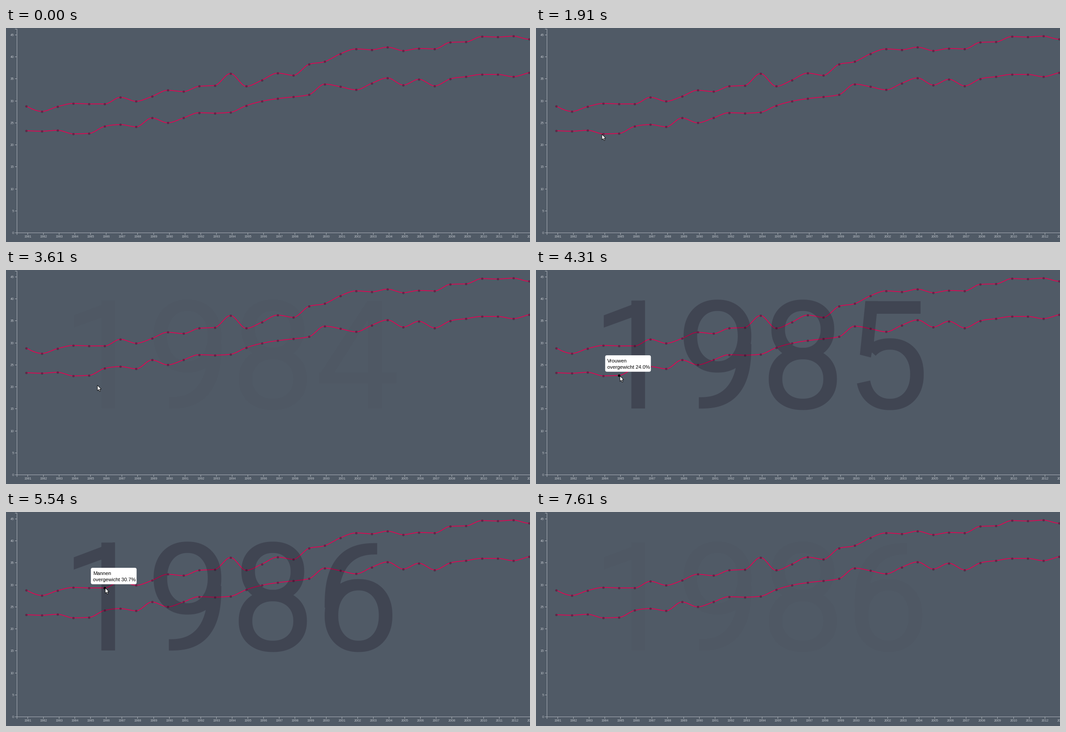
These frames come from a looping animation (1169x479 px, 8.09 s). A matplotlib script:

```python
import numpy as np
import matplotlib.pyplot as plt
from matplotlib.animation import FuncAnimation
from matplotlib.patches import FancyBboxPatch, PathPatch, Polygon
from matplotlib.path import Path

W, H, DPI = 1169, 479, 64
PX = 72 / DPI                      # points per pixel
FRAMES, STEP = 200, 40.45          # one loop of 8090 ms

BG, AXIS, LABEL, LINE, DOT = "#505a66", "#abb1b9", "#bfc4ca", "#e60052", "#501e3c"
BIG = (0.08, 0.03, 0.10)
BIG_ALPHA, GHOST = 0.25, 0.06
FADE_OUT = 500

plt.rcParams["font.family"] = "Liberation Sans"

# yearly share in percent, from 1981 on
MEN = [28.8, 27.6, 28.7, 29.4, 29.3, 29.3, 30.8, 29.9, 31.0, 32.4, 32.1,
       33.3, 33.5, 36.2, 33.3, 34.7, 36.3, 35.8, 38.3, 38.9, 40.7, 41.8,
       41.6, 42.2, 41.4, 41.9, 41.8, 43.3, 43.4, 44.6, 44.5, 44.7, 44.0, 44.1]
WOMEN = [23.2, 23.1, 23.3, 22.5, 22.6, 24.2, 24.6, 24.1, 26.1, 25.0, 26.1,
         27.3, 27.2, 27.4, 28.9, 29.9, 30.5, 30.9, 31.4, 33.8, 33.2, 32.5,
         34.0, 35.2, 33.6, 34.9, 33.4, 35.0, 35.5, 36.0, 36.0, 35.5, 36.4, 37.2]
YEARS = 1981 + np.arange(len(MEN))


def px(year):
    return 45.1 + 35.05 * (year - 1981)


def py(value):
    return 458.5 - 9.85 * np.asarray(value)


# year, label, share, series, appears, fade-in time, disappears
HOVERS = [
    (1984, "Vrouwen", "23.9", WOMEN, 1980, 220, 2910),
    (1985, "Vrouwen", "24.0", WOMEN, 4270, 0, 4770),
    (1986, "Mannen", "30.7", MEN, 5300, 180, 6540),
]

# pointer stops (time, x, y): it rests on each hovered dot in between
STOPS = [(70, 1029, 424), (620, 290, 241), (840, 223, 259), (1680, 147, 239),
         (1910, 147, 238), (3610, 204, 258), (7300, 688, 390), (7590, 1030, 474)]
for year, _, _, values, start, _, end in HOVERS:
    tip = px(year) + 1, float(py(values[year - 1981]))
    STOPS += [(start + 150, *tip), (end, *tip)]
TRACK = np.array(sorted(STOPS), float)
ARROW = np.array([(0, 0), (0, 12.2), (2.8, 9.6), (4.8, 14), (6.7, 13.2),
                  (4.8, 8.9), (8.6, 8.7)])


def monotone(x, y, at):
    """Cubic curve through the points that never overshoots them."""
    h = np.diff(x)
    s = np.diff(y) / h
    mean = (s[:-1] * h[1:] + s[1:] * h[:-1]) / (h[:-1] + h[1:])
    low = np.minimum(np.minimum(abs(s[:-1]), abs(s[1:])), 0.5 * abs(mean))
    inner = (np.sign(s[:-1]) + np.sign(s[1:])) * low
    m = np.concatenate([[1.5 * s[0] - inner[0] / 2], inner,
                        [1.5 * s[-1] - inner[-1] / 2]])
    k = np.clip(np.searchsorted(x, at, side="right") - 1, 0, len(h) - 1)
    u = (at - x[k]) / h[k]
    return ((1 + 2 * u) * (1 - u) ** 2 * y[k] + u * (1 - u) ** 2 * h[k] * m[k]
            + u * u * (3 - 2 * u) * y[k + 1] - u * u * (1 - u) * h[k] * m[k + 1])


# Digits are built from bars and curved bands, y up, on a 2048 unit em.
def band(cx, cy, rx, ry, a0=360, a1=0, n=2.2):
    """Clockwise superellipse stroke, heavier at the sides than at the top."""
    a = np.radians(np.linspace(a0, a1, 90))
    c, s = np.cos(a), np.sin(a)
    unit = np.column_stack([np.sign(c) * abs(c) ** (2 / n),
                            np.sign(s) * abs(s) ** (2 / n)])
    half = np.array([92, 77])
    outer, inner = unit * ((rx, ry) + half), unit * ((rx, ry) - half)
    return np.vstack([outer, inner[::-1]]) + (cx, cy)


def bar(x0, y0, x1, y1):
    return np.array([(x0, y0), (x0, y1), (x1, y1), (x1, y0)], float)


def shape(*points):
    return np.array(points, float)


NINE = [band(558, 982, 366, 418), band(306, 875, 618, 799, 0, -90, n=2.6)]
DIGITS = {
    "1": [bar(544, 0, 729, 1464),
          shape((171, 1097), (171, 1264), (700, 1464), (729, 1464), (544, 1233))],
    "4": [bar(699, 0, 885, 1456), bar(35, 339, 1087, 491),
          shape((35, 339), (35, 448), (688, 1456), (699, 1456), (699, 1208),
                (245, 491))],
    "5": [bar(258, 1285, 1004, 1456), band(590, 465, 365, 410, 133, -167),
          shape((184, 730), (258, 1456), (430, 1456), (371, 888), (332, 692))],
    "6": [(1129, 1456) - part for part in NINE],
    "8": [band(562, 1073, 333, 327), band(562, 400, 369, 344)],
    "9": NINE,
}


def big_number(number, left=123, base=310, scale=0.165, advance=1150):
    parts = []
    for i, ch in enumerate(str(number)):
        for part in DIGITS[ch]:
            pts = (part + (i * advance, 0)) * (scale, -scale) + (left, base)
            parts.append(Path(np.vstack([pts, pts[:1]]), closed=True))
    return Path.make_compound_path(*parts)


fig = plt.figure(figsize=(W / DPI, H / DPI), dpi=DPI, facecolor=BG)
ax = fig.add_axes([0, 0, 1, 1])
ax.set_xlim(0, W)
ax.set_ylim(H, 0)
ax.axis("off")


def label(x, y, text, size, **kw):
    return ax.text(x, y, text, fontsize=size * PX, va="baseline", **kw)


def rule(xs, ys):
    ax.plot(xs, ys, color=AXIS, lw=PX, solid_capstyle="butt",
            solid_joinstyle="miter", snap=False, zorder=1)


# axes
rule([20, 24.5, 24.5], [2.5, 2.5, 458])
rule([24, W + 5], [458.5, 458.5])
rule([24.5, 24.5], [459, 463])
for v in range(0, 50, 5):
    y = np.floor(py(v)) + 0.5
    rule([20, 24], [y, y])
    label(18, y + 2.6, str(v), 7.2, color=LABEL, ha="right")
for year in YEARS:
    x = np.floor(48.6 + 35.05 * (year - 1981)) + 0.5
    rule([x, x], [459, 463])
    label(x + 0.2, 469.2, str(year), 7.2, color=LABEL, ha="center", clip_on=True)

# series
fine = np.linspace(px(1981), px(2014), 900)
for values in (MEN, WOMEN):
    ax.plot(fine, monotone(px(YEARS), py(values), fine), color=LINE,
            lw=1.7 * PX, zorder=2)
    ax.plot(px(YEARS), py(values), "o", color=DOT, alpha=0.65,
            ms=5.4 * PX, mew=0, zorder=3)

# moving parts
number = PathPatch(big_number(1984), fc=BIG, lw=0, alpha=0, zorder=4)
ax.add_patch(number)
spot, = ax.plot([], [], "o", color="black", ms=5.6 * PX, mew=0, zorder=5)
card = FancyBboxPatch((0, 0), 102, 36.8, fc="white", lw=0, zorder=6,
                      boxstyle="round,pad=0,rounding_size=4")
ax.add_patch(card)
head = label(0, 0, "", 11.2, color="black", zorder=7)
body = label(0, 0, "", 11.2, color="black", zorder=7)
pointer = Polygon(ARROW, closed=True, fc="white", ec="black", lw=0.9 * PX,
                  joinstyle="miter", zorder=8)
ax.add_patch(pointer)

NUMBERS = {h[0]: big_number(h[0]) for h in HOVERS}


def level(t, start, rise, end):
    if t < end:
        return 1.0 if rise == 0 else min(1.0, (t - start) / rise)
    return max(0.0, 1 - (t - end) / FADE_OUT)


def draw(i):
    t = (i + 0.5) * STEP
    past = [h for h in HOVERS if h[4] <= t]
    a = 0.0
    if past:
        year, who, share, values, start, rise, end = past[-1]
        a = level(t, start, rise, end)
        x, y = px(year), float(py(values[year - 1981]))
        number.set_path(NUMBERS[year])
        number.set_alpha(BIG_ALPHA * (max(a, GHOST) if t > end else a))
        spot.set_data([x], [y])
        card.set_bounds(x - 31, y - 45, 102, 36.8)
        head.set_text(who)
        body.set_text(f"overgewicht {share}%")
        head.set_position((x - 26.5, y - 28.7))
        body.set_position((x - 26.5, y - 14.7))
    else:
        number.set_alpha(0)
    for part in (spot, card, head, body):
        part.set_alpha(a)
        part.set_visible(a > 0)

    pointer.set_visible(TRACK[0, 0] <= t < TRACK[-1, 0])
    tip = [monotone(TRACK[:, 0], TRACK[:, k], t) for k in (1, 2)]
    pointer.set_xy(ARROW + tip)
    return number, spot, card, head, body, pointer


anim = FuncAnimation(fig, draw, frames=FRAMES, interval=STEP,
                     repeat=True, repeat_delay=0, blit=False)
plt.show()
```
